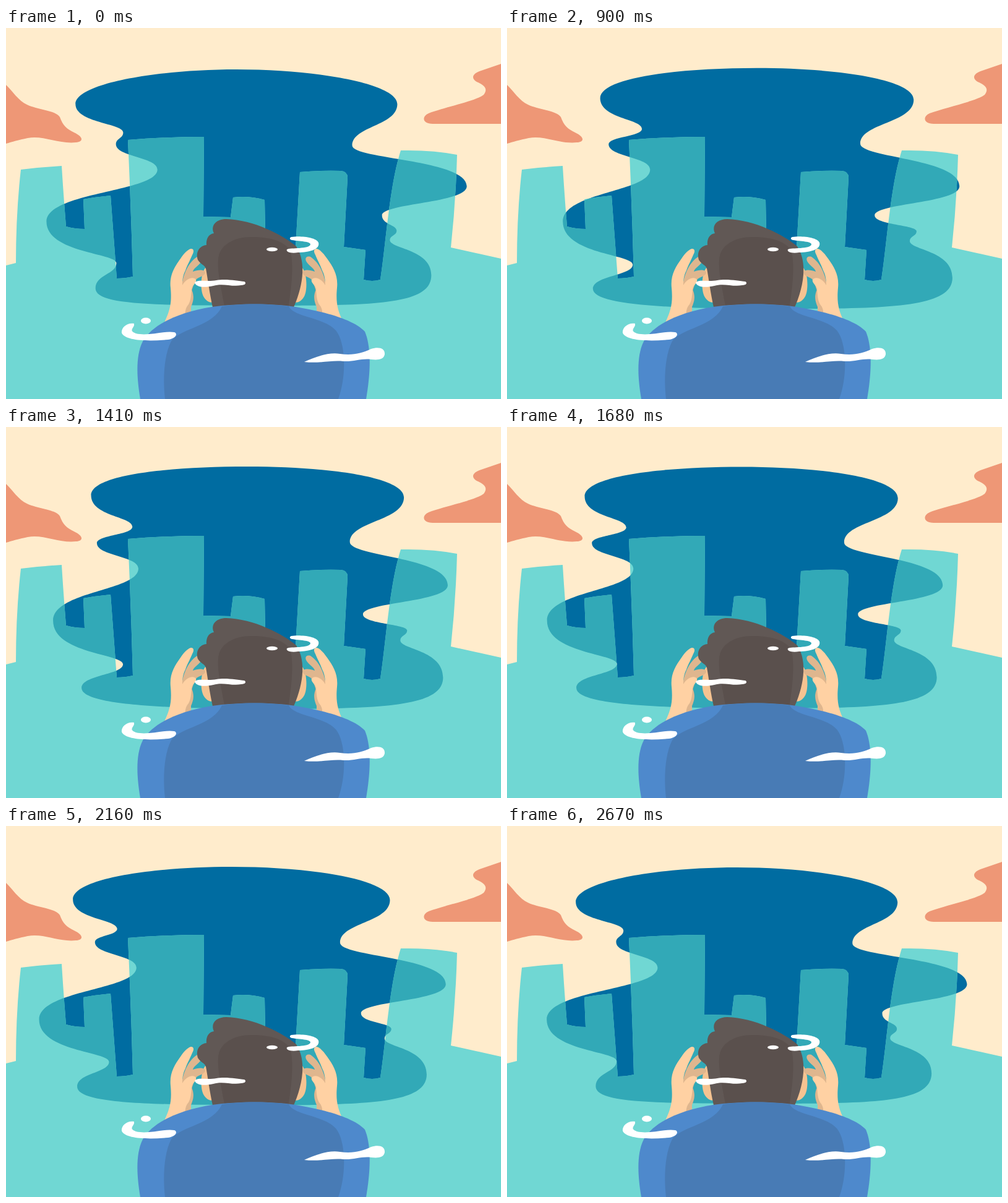
An HTML page that plays this animation: 800 by 600 pixels, repeating every 2.7 s.

```html
<!DOCTYPE html>
<html lang="en">
<head>
<meta charset="utf-8">
<title>City swirl</title>
<style>
html, body { margin: 0; width: 100%; height: 100%; overflow: hidden; background: #ffeccc; }
svg { display: block; width: 100vw; height: 100vh; }
</style>
</head>
<body>
<svg viewBox="0 0 800 600">
  <defs>
    <path id="blob"/>
    <path id="city" d="M0 384L16 380Q16 300 24 229Q57 225 90 223Q93 272 97 321Q111 325 127 325L125 277Q147 273 169 271L179 405Q193 405 205 402Q202 290 197 181Q258 176 320 176L319 305L363 306L367 274Q393 271 418 278L419 330L468 355L475 233Q510 230 541 231Q552 232 552 242L546 354L581 359L578 407Q592 411 605 407C614 350 619 258 638 198Q690 197 729 205Q727 280 719 355L800 373V600H0Z"/>
    <clipPath id="skyline"><use href="#city"/></clipPath>
    <g id="hand">
      <path fill="#f5c391" d="M322 388C314 398 314 425 319 434C323 441 328 444 334 444L330 395Z"/>
      <path fill="#dfb68e" d="M284 418C286 398 295 379 309 370C317 368 319 374 314 380C308 387 303 389 302 394C310 391 321 390 322 396C320 403 308 402 305 410L299 428Z"/>
      <path fill="#ffd1a3" d="M256 476C266 455 268 443 266 420C264 400 272 387 282 373C288 364 294 358 299 357C304 357 304 362 301 367C297 377 293 383 290 392C287 398 285 404 285 416C291 405 303 401 307 407C309 413 299 416 300 425C304 436 302 440 298 446C296 455 297 464 293 476Z"/>
      <path fill="#dfb68e" d="M300 423C306 436 301 446 299 451L299 476H287C291 460 288 455 295 447C299 440 299 432 300 423Z"/>
    </g>
  </defs>

  <rect width="800" height="600" fill="#ffeccc"/>
  <g fill="#ee9776">
    <path d="M0 92C10 101 20 118 34 124C50 132 80 133 87 144C92 158 98 163 110 169C125 176 126 184 113 185C85 188 60 173 35 178C20 181 10 184 0 187Z"/>
    <path d="M800 58L765 70C752 75 752 83 763 88C776 94 778 100 772 108C760 118 710 128 683 138C672 143 672 155 690 155H800Z"/>
  </g>
  <use href="#blob" fill="#006ca1"/>
  <use href="#city" fill="#70d7d3"/>
  <g clip-path="url(#skyline)"><use href="#blob" fill="#32a9b7"/></g>

  <use href="#hand"/>
  <use href="#hand" transform="matrix(-1 0 0 1 801 0)"/>
  <path fill="#615855" d="M335 456C329 430 326 405 323 389C321 383 314 382 310 375C306 362 313 352 324 351C323 342 327 333 336 332C330 319 340 309 356 309C400 310 448 335 469 353C487 380 479 422 463 456Z"/>
  <path fill="#5a504d" d="M354 456C349 425 341 395 343 374C345 349 372 337 398 338C425 338 452 344 460 362C466 390 460 425 456 456Z"/>
  <path fill="#4e89cc" d="M217 600C212 570 208 530 222 505C238 479 278 460 333 451C375 445 430 445 468 451C522 460 563 473 580 491C592 520 588 565 582 600Z"/>
  <path fill="#487bb5" d="M257 600C253 565 256 525 268 505C285 485 335 482 349 450Q400 443 457 450C465 468 515 468 533 489C550 510 550 565 537 600Z"/>

  <g fill="#fff">
    <path d="M305 412C310 406 325 411 340 408C355 405 375 409 385 410C389 412 387 416 380 416C365 419 350 412 335 417C322 420 308 420 305 412Z"/>
    <ellipse cx="430" cy="358" rx="9" ry="3.3"/>
    <path d="M461 338C475 336 501 338 505 347C508 358 490 363 472 363C460 365 452 362 454 358C460 355 490 358 492 350C492 345 475 345 462 343C458 342 458 339 461 338Z"/>
    <ellipse cx="226" cy="473.5" rx="8" ry="5"/>
    <path d="M207 478C195 476 186 485 187 493C192 506 230 507 262 504C275 502 278 494 272 492C255 489 230 499 210 494C198 490 206 485 207 481Z"/>
    <path d="M482 540C500 532 520 524 540 527C560 530 575 526 590 519C603 515 613 518 612 528C610 537 600 537 590 536C575 534 562 540 545 539C525 537 505 543 482 540Z"/>
  </g>
</svg>
<script>
const LOOP = 2700;
const MIDDLE = 310;

// Turning points of the sides: x, y, share of drift (the rest is sway), bend height of the curve leading in
const RIGHT = [
  [633, 123, 0],
  [560, 190, .35, .53],
  [745, 256, 1, .34],
  [608, 303, 1, .58],
  [632, 328, -.15, .6],
  [621, 343, -.15, .5],
  [688, 400, -.2, .25]
];
const LEFT = [
  [145, 421, .8],
  [179, 380, 0, .55],
  [66, 313, 0, .24],
  [245, 229, 1, .57],
  [178, 188, 1, .5],
  [190, 169, -.1, .5],
  [113, 123, -.35, .33]
];

const wave = (turn, lag) => Math.cos(turn - lag * Math.PI / 180);
const curve = (...pts) => 'C' + pts.map(v => v.toFixed(2)).join(' ');

// S-bends between turning points, upright at both ends
const chain = nodes => nodes.slice(1).map(([x, y, bend], i) => {
  const [px, py] = nodes[i], mid = py + (y - py) * bend;
  return curve(px, mid, x, mid, x, y);
}).join('');

function outline(t) {
  const turn = 2 * Math.PI * t / LOOP;
  const sway = 6 + 18.5 * wave(turn, 111);
  const drift = -19 + 22 * wave(turn, 50) + 4.5 * wave(2 * turn, 0);
  const lift = .5 + .5 * wave(turn, 180);

  const move = ([x, y, mix, bend]) => [
    x + sway * (1 - mix) + drift * mix,
    y + lift * (1 - mix) * (y - MIDDLE) / 20,
    bend
  ];
  const right = RIGHT.map(move), left = LEFT.map(move);
  const [rx, ry] = right[0], [ex, ey] = right.at(-1);
  const [lx, ly] = left[0], [fx, fy] = left.at(-1);
  const topX = (rx + fx) / 2, topY = 67 - 3 * lift;
  const [lowX, lowY] = move([420, 449, 0]);

  return `M${rx} ${ry}` + chain(right)
    + curve(ex, ey + 47, lowX + 180, lowY, lowX, lowY)
    + curve(lowX - 190, lowY, lx, ly + 26, lx, ly)
    + chain(left)
    + curve(fx, fy - 33, topX - 130, topY, topX, topY)
    + curve(topX + 130, topY, rx, ry - 33, rx, ry) + 'Z';
}

const blob = document.getElementById('blob');
const start = performance.now();
function draw() {
  blob.setAttribute('d', outline((performance.now() - start) % LOOP));
  requestAnimationFrame(draw);
}
draw();
</script>
</body>
</html>
```
